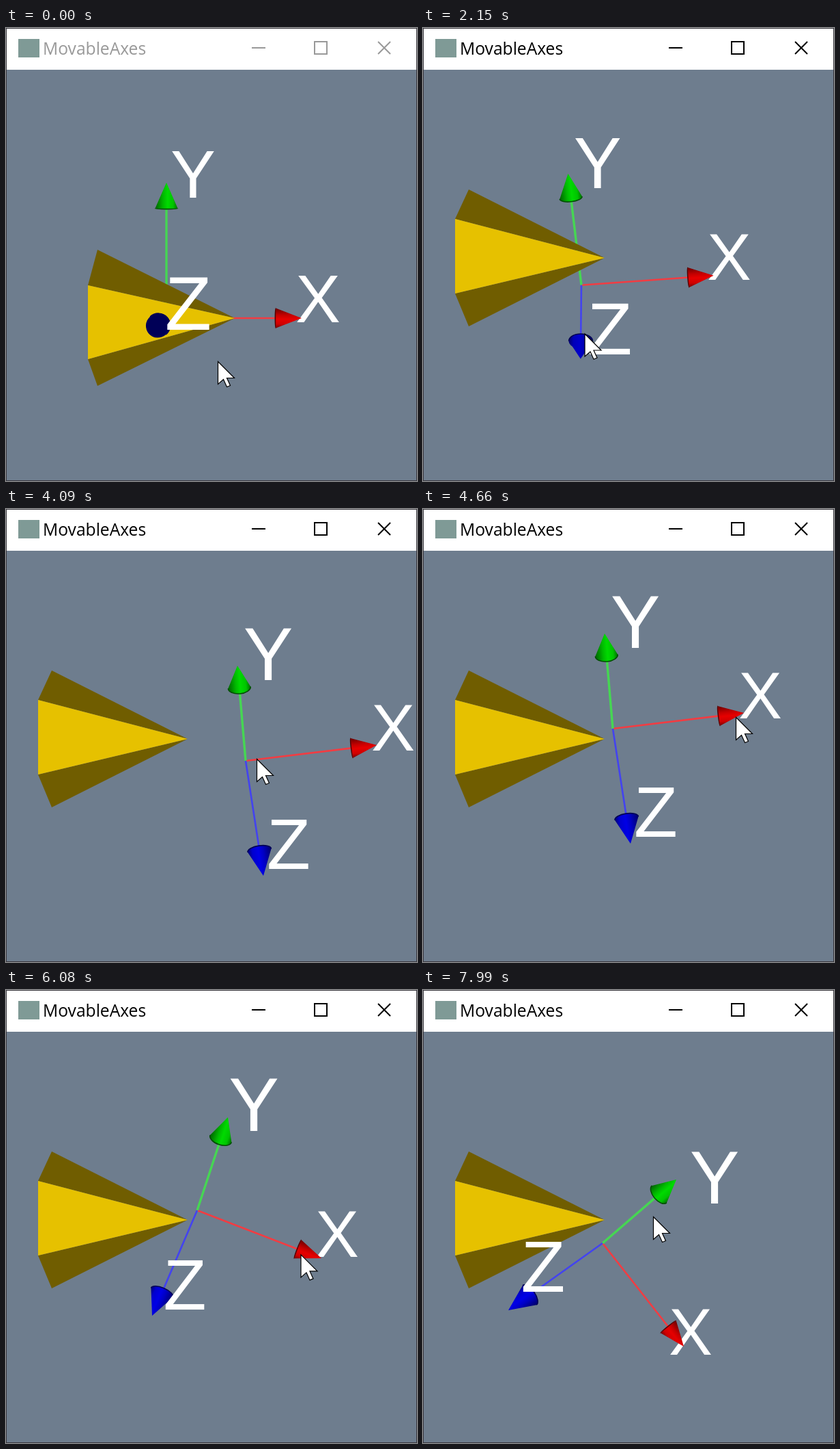
Write an HTML page with a canvas that moves like this. It is 602 px wide and 662 px high and loops after 8.03 s.

```html
<!DOCTYPE html>
<html lang="en">
<head>
<meta charset="utf-8">
<title>MovableAxes</title>
<style>
html, body { margin: 0; width: 100%; height: 100%; overflow: hidden; background: #6e7d8e; }
canvas { display: block; }
</style>
</head>
<body>
<canvas id="stage" width="602" height="662"></canvas>
<script>
const ctx = document.getElementById('stage').getContext('2d');
const LOOP = 8030;

// Pose: origin, then per axis: tip x, tip y, rim depth, label centre, label baseline, label height.
const facing = [235,424, 433,424,1,457,430,68, 235,226,1,274,248,68, 218,439,18,267,441,77];
const tilted = [230,362, 421,339,1,443,345,66, 198,222,9,244,242,75, 239,529,6,278,518,72];
const right = [351,368, 543,345,1,567,353,66, 339,229,9,384,250,75, 377,536,7,414,526,72];
const lowered = [280,322, 462,392,1,485,390,66, 325,186,9,363,206,76, 214,476,7,262,467,71];
const raised = [265,297, 432,396,1,421,448,66, 332,170,9,432,225,75, 175,437,7,196,381,71];
const final = [263,370, 382,521,1,392,533,66, 371,277,9,427,312,75, 125,468,8,176,441,73];

const mix = (a, b, k) => a.map((v, i) => v + (b[i] - v) * k);

function shift(pose, dx, dy) {
  const p = pose.slice();
  p[0] += dx; p[1] += dy;
  for (let i = 2; i < p.length; i += 6) {
    p[i] += dx; p[i + 1] += dy;
    p[i + 3] += dx; p[i + 4] += dy;
  }
  return p;
}

// Turns the tips about the origin; labels keep their offset from the tips.
function spin(pose, deg) {
  const p = pose.slice(), c = Math.cos(deg * Math.PI / 180), s = Math.sin(deg * Math.PI / 180);
  for (let i = 2; i < p.length; i += 6) {
    const x = p[i] - p[0], y = p[i + 1] - p[1];
    const dx = x * c - y * s - x, dy = x * s + y * c - y;
    p[i] += dx; p[i + 1] += dy;
    p[i + 3] += dx; p[i + 4] += dy;
  }
  return p;
}

const axesTrack = [
  [1640, facing],
  [2300, shift(mix(facing, tilted, .7), 0, -12)],
  [2700, tilted],
  [3280, tilted],
  [4090, right],
  [4130, shift(right, 4, -1)],
  [4440, shift(right, -73, -47)],
  [4810, shift(right, -73, -47)],
  [5310, lowered],
  [5460, spin(lowered, 26)],
  [5640, spin(lowered, 12)],
  [6000, lowered],
  [6450, lowered],
  [6970, raised],
  [7220, shift(raised, 4, 6)],
  [7600, shift(spin(final, 4), 4, 10)],
  [7950, final]
];

const coneTrack = [
  [670, [335,424, 134,324, 120,376, 120,484, 134,523]],
  [1080, [266,336, 67,236, 47,279, 47,388, 67,436]]
];

const cursorTrack = [
  [100, [310,487]], [650, [292,428]], [1080, [223,340]], [1180, [228,381]],
  [1620, [226,436]], [2300, [238,448]], [2700, [241,454]], [2920, [241,454]],
  [3280, [246,359]], [4090, [367,365]], [4130, [371,364]], [4440, [294,318]],
  [4660, [458,304]], [4810, [458,304]], [5310, [445,410]], [5460, [408,456]],
  [5640, [430,434]], [6000, [445,408]], [6400, [318,205]], [6500, [318,205]],
  [6970, [300,222]], [7220, [304,230]], [7600, [332,312]], [7950, [337,331]]
];

function at(track, t) {
  if (t <= track[0][0]) return track[0][1];
  for (let i = 1; i < track.length; i++) {
    const [t0, a] = track[i - 1], [t1, b] = track[i];
    if (t <= t1) {
      const k = (t - t0) / (t1 - t0);
      return mix(a, b, k * k * (3 - 2 * k));
    }
  }
  return track[track.length - 1][1];
}

const axes = [
  { name: 'X', at: 2, width: 14.5, rgb: [230,0,0], line: '#f23c42' },
  { name: 'Y', at: 8, width: 16.5, rgb: [0,218,0], line: '#46d653' },
  { name: 'Z', at: 14, width: 17.5, rgb: [0,0,230], line: '#4343f0' }
];

const shade = (rgb, k) => `rgb(${rgb.map(v => Math.round(v * k)).join()})`;

function polygon(points, fill) {
  ctx.beginPath();
  for (let i = 0; i < points.length; i += 2) ctx.lineTo(points[i], points[i + 1]);
  ctx.closePath();
  ctx.fillStyle = fill;
  ctx.fill();
}

function drawAxis(axis, pose) {
  const [ox, oy] = pose, [tx, ty, depth] = pose.slice(axis.at);
  const dx = tx - ox, dy = ty - oy;
  const ratio = .815 - depth * .005;
  const bx = ox + dx * ratio, by = oy + dy * ratio;
  const length = Math.hypot(tx - bx, ty - by);
  const w = axis.width, away = Math.min(1, Math.max(0, (depth - 9) / 9));

  ctx.strokeStyle = axis.line;
  ctx.lineWidth = axis.name === 'Y' ? 3.4 : 2.6;
  ctx.beginPath();
  ctx.moveTo(ox, oy);
  ctx.lineTo(bx, by);
  ctx.stroke();

  ctx.save();
  ctx.translate(bx, by);
  ctx.rotate(Math.atan2(dy, dx));
  const g = ctx.createLinearGradient(0, -w, 0, w);
  const level = k => shade(axis.rgb, k + (.38 - k) * away);
  g.addColorStop(0, level(.45));
  g.addColorStop(.35, level(.85));
  g.addColorStop(.55, level(1));
  g.addColorStop(.8, level(.9));
  g.addColorStop(1, level(.5));
  ctx.fillStyle = g;
  ctx.beginPath();
  ctx.ellipse(0, 0, depth, w, 0, Math.PI / 2, Math.PI * 1.5);
  ctx.lineTo(length, 0);
  ctx.closePath();
  ctx.fill();
  if (away > 0) {
    ctx.beginPath();
    ctx.ellipse(0, 0, depth, w, 0, 0, Math.PI * 2);
    ctx.fill();
  }
  ctx.strokeStyle = shade(axis.rgb, .36);
  ctx.lineWidth = 1.6;
  ctx.beginPath();
  ctx.ellipse(0, 0, depth, w, 0, Math.PI / 2, Math.PI * 1.5);
  ctx.stroke();
  ctx.restore();
}

function drawLabel(axis, pose) {
  const [x, y, height] = pose.slice(axis.at + 3);
  ctx.font = `${height / .688}px "Liberation Sans", Arial, sans-serif`;
  ctx.textAlign = 'center';
  ctx.fillStyle = '#fff';
  ctx.fillText(axis.name, x, y);
}

function drawCone(c) {
  const tip = c.slice(0, 2);
  polygon([...tip, ...c.slice(2, 6)], '#705d00');
  polygon([...tip, ...c.slice(6, 10)], '#705d00');
  polygon([...tip, ...c.slice(4, 8)], '#e6c100');
}

function drawWindow(t) {
  ctx.fillStyle = '#fff';
  ctx.fillRect(0, 0, 602, 61);
  const active = Math.min(1, Math.max(0, (t - 670) / 200));
  const ink = shade([153, 153, 153], 1 - active);
  ctx.fillStyle = '#7f9a96';
  ctx.fillRect(18, 16, 31, 27);
  ctx.fillStyle = ink;
  ctx.font = '24.6px "Open Sans", "Noto Sans", sans-serif';
  ctx.textAlign = 'left';
  ctx.fillText('MovableAxes', 54, 39);
  ctx.fillRect(360, 28, 20, 2);
  ctx.strokeStyle = ink;
  ctx.lineWidth = 2;
  ctx.strokeRect(452, 20, 18, 18);
  ctx.beginPath();
  ctx.moveTo(545, 20); ctx.lineTo(563, 38);
  ctx.moveTo(563, 20); ctx.lineTo(545, 38);
  ctx.stroke();
  ctx.strokeStyle = '#39373d';
  ctx.lineWidth = 1;
  ctx.strokeRect(.5, .5, 601, 661);
}

function drawCursor([x, y]) {
  ctx.save();
  ctx.translate(x + .5, y + .5);
  polygon([0,0, 0,33, 8,26, 13,37, 18,35, 13,24, 24,24], '#fff');
  ctx.strokeStyle = '#000';
  ctx.lineWidth = 1.2;
  ctx.stroke();
  ctx.restore();
}

function draw() {
  const t = performance.now() % LOOP;
  const pose = at(axesTrack, t);
  const [x, y, z] = axes;
  ctx.fillStyle = '#6e7d8e';
  ctx.fillRect(0, 0, 602, 662);
  drawLabel(x, pose);
  drawLabel(y, pose);
  drawAxis(x, pose);
  drawAxis(y, pose);
  drawCone(at(coneTrack, t));
  drawAxis(z, pose);
  drawLabel(z, pose);
  drawWindow(t);
  drawCursor(at(cursorTrack, t));
  requestAnimationFrame(draw);
}
draw();
</script>
</body>
</html>
```
